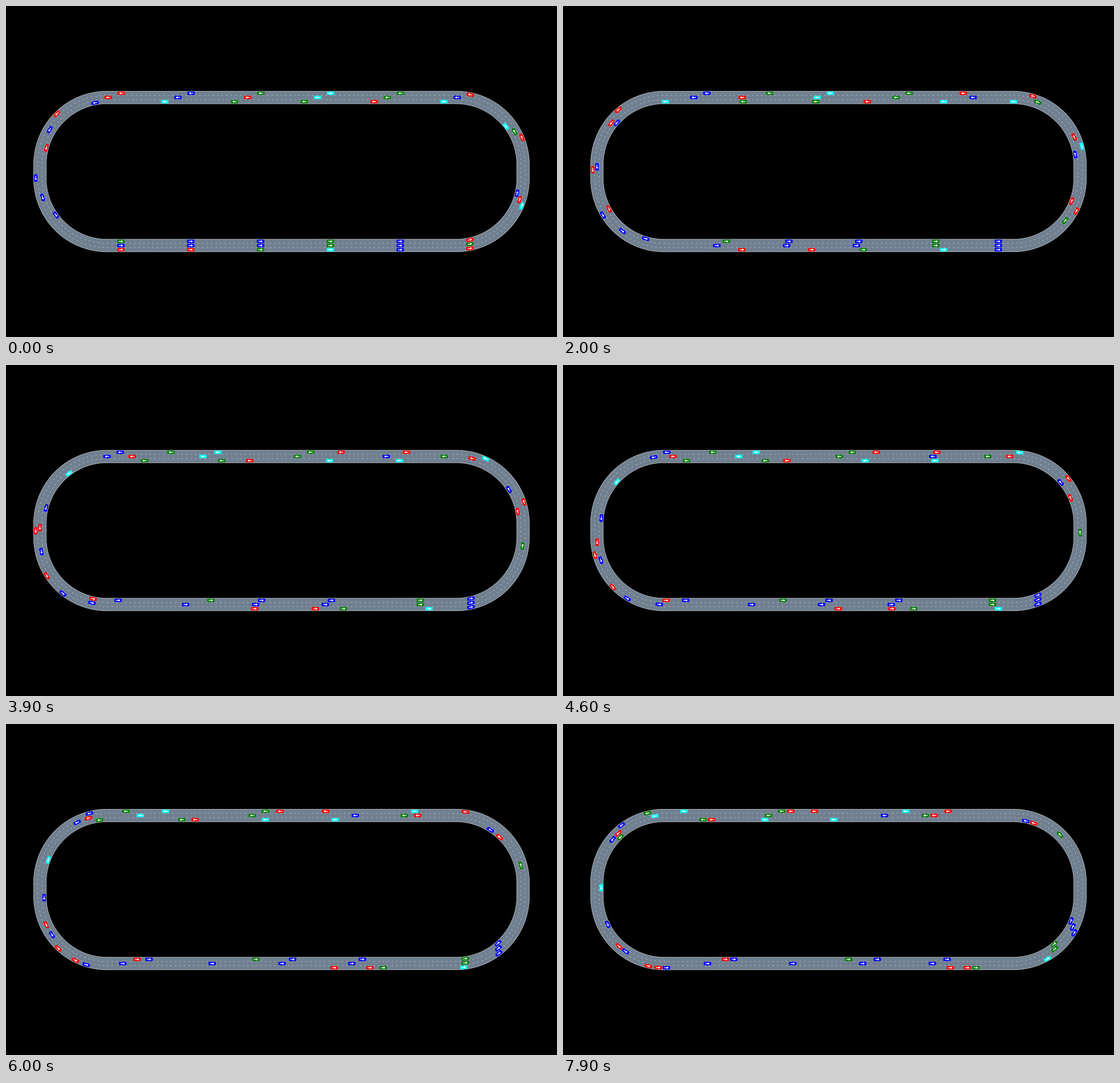
Recreate the animation shown at these times as a matplotlib script. Size 966 by 580 pixels, loop 8000 ms.

```python
import numpy as np
import matplotlib.pyplot as plt
from matplotlib.animation import FuncAnimation
from matplotlib.collections import PolyCollection

W, H, DPI = 966, 580, 100
FPS, FRAMES, SUBSTEPS = 10, 80, 10
UNIT = 1.224                      # pixels per road unit
LONG, SHORT = 500 * UNIT, 20 * UNIT
LEFT, RIGHT = W / 2 - LONG / 2, W / 2 + LONG / 2
TOP, BOTTOM = H / 2 - SHORT / 2, H / 2 + SHORT / 2
CORNERS = [(RIGHT, BOTTOM), (RIGHT, TOP), (LEFT, TOP), (LEFT, BOTTOM)]

# Lane radius in units, then its cars in driving order; capitals drive briskly.
LANES = [(102, "rrgcBrCrrGcGBrrb"),
         (96, "bbbGBgrgBGcrBrbB"),
         (90, "GBBGBrbccrgGcBrB")]

# Colour, calm and brisk cruising speed (px/s), distance kept to the car ahead.
TYPES = {"r": ("#ff0000", 69, 69, 13),
         "g": ("#008000", 33, 37.5, 45),
         "b": ("#0000ff", 21.7, 25.5, 60),
         "c": ("#00ffff", 54, 61, 66)}
START_SPEED = 48


def track_length(r):
    return 2 * (LONG + SHORT) + 2 * np.pi * r


def pose(s, r):
    """Position and heading after driving s along the loop of corner radius r."""
    s %= track_length(r)
    quarter = r * np.pi / 2
    for i, straight in enumerate((LONG, SHORT, LONG, SHORT)):
        a = i * np.pi / 2
        if s < straight:
            cx, cy = CORNERS[i - 1]
            return (cx + r * np.sin(a) + s * np.cos(a),
                    cy + r * np.cos(a) - s * np.sin(a), a)
        s -= straight
        if s < quarter or i == 3:
            a += s / r
            cx, cy = CORNERS[i]
            return cx + r * np.sin(a), cy + r * np.cos(a), a
        s -= quarter


def drive(r, cars):
    """Car-following model: cruise freely, or brake towards the car ahead."""
    cruise = np.array([TYPES[c.lower()][1 + c.isupper()] for c in cars])
    keep = np.array([TYPES[c.lower()][3] for c in cars])
    s = (20 + 100 * np.arange(len(cars))) * UNIT
    v = np.full(len(cars), float(START_SPEED))
    dt = 1 / FPS / SUBSTEPS
    history = []
    for _ in range(FRAMES):
        history.append(s.copy())
        for _ in range(SUBSTEPS):
            gap = (np.roll(s, -1) - s) % track_length(r)
            safe = np.roll(v, -1) + 32 * (1 - np.exp((keep - gap) / 58))
            free = (cruise - v) / np.where(cruise > v, 1.9, 1.15)
            v = v + np.minimum(free, (safe - v) / .5) * dt
            s = s + v * dt
    return history


def loop(r):
    steps = np.linspace(0, track_length(r), 1500, endpoint=False)
    pts = [pose(s, r)[:2] for s in steps]
    return np.array(pts + pts[:1])


def rounded_box(length, width, r):
    pts = []
    for q, (sx, sy) in enumerate([(1, 1), (-1, 1), (-1, -1), (1, -1)]):
        for a in np.linspace(q, q + 1, 5) * np.pi / 2:
            pts.append((sx * (length / 2 - r) + r * np.cos(a),
                        sy * (width / 2 - r) + r * np.sin(a)))
    return np.array(pts)


BODY = rounded_box(13, 6, 1.3)
ARROW = np.array([(-3.8, -.65), (.6, -.65), (.6, -2.1), (3.9, 0),
                  (.6, 2.1), (.6, .65), (-3.8, .65)])


def place(shape, x, y, a):
    c, s = np.cos(a), np.sin(a)
    return shape @ np.array([[c, -s], [s, c]]) + (x, y)


fig = plt.figure(figsize=(W / DPI, H / DPI), dpi=DPI, facecolor="black")
ax = fig.add_axes([0, 0, 1, 1])
ax.set_xlim(0, W)
ax.set_ylim(H, 0)
ax.axis("off")

outer_edge, inner_edge = loop(105 * UNIT), loop(87 * UNIT)
ax.fill(*outer_edge.T, color="slategray", lw=0, zorder=1)
ax.fill(*inner_edge.T, color="black", lw=0, zorder=1.1)
for edge in (outer_edge, inner_edge):
    ax.plot(*edge.T, color="white", alpha=.7, lw=.55, zorder=2)
for r in (99, 93):
    ax.plot(*loop(r * UNIT).T, color="white", alpha=.5, lw=.6,
            ls=(0, (3.5, 6)), dash_capstyle="butt", zorder=2)

runs = [(r * UNIT, drive(r * UNIT, cars)) for r, cars in LANES]
paint = [TYPES[c.lower()][0] for _, cars in LANES for c in cars]
bodies = PolyCollection([BODY], facecolors=paint, edgecolors="none", zorder=3)
arrows = PolyCollection([ARROW], facecolors="white", edgecolors="none", zorder=4)
ax.add_collection(bodies, autolim=False)
ax.add_collection(arrows, autolim=False)


def update(frame):
    poses = [pose(s, r) for r, history in runs for s in history[frame]]
    bodies.set_verts([place(BODY, *p) for p in poses])
    arrows.set_verts([place(ARROW, *p) for p in poses])
    return bodies, arrows


anim = FuncAnimation(fig, update, frames=FRAMES, interval=1000 / FPS,
                     repeat=True, repeat_delay=0)
plt.show()
```
